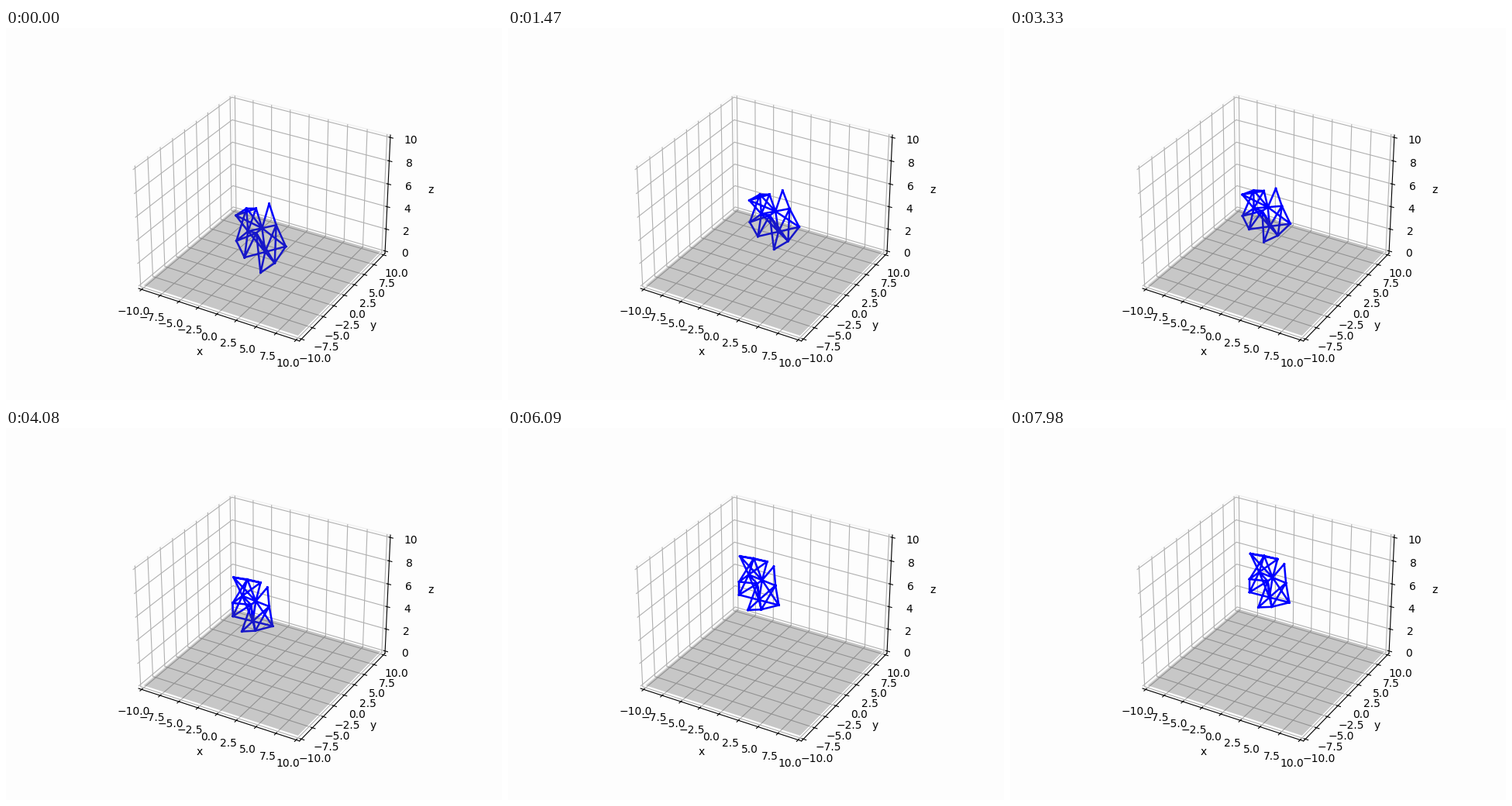
Write a matplotlib script that moves like this. It is 640 by 480 pixels and loops after 8 s.

```python
from itertools import combinations

import numpy as np
import matplotlib.pyplot as plt
from matplotlib.animation import FuncAnimation
from matplotlib.lines import Line2D
from matplotlib.transforms import IdentityTransform

W, H = 640, 480
FRAMES, STEP = 200, 40
PAPER = "#fdfdfd"
HOP, PERIOD, FIRST_HOP = 12, 820, 483

# Outer joints in a unit box, before and after the body turns
JOINTS = "abcdefghikn"
BEFORE = np.array([
    (.5, .12), (.17, -.5), (.31, -.19), (-.49, -.33), (-.09, -.43),
    (-.48, .04), (-.32, .28), (0, .5), (.28, .36), (-.25, -.1), (-.28, -.43)])
AFTER = np.array([
    (.5, .4), (.38, -.31), (.42, .04), (-.43, -.5), (.22, -.4),
    (-.45, -.03), (-.45, .21), (-.24, .49), (.08, .48), (-.22, -.16),
    (-.1, -.46)])

# Every two joints of a cell are tied by a spring
CELLS = "dnekj", "bcj", "acjl", "fgkm", "fkn", "jklm", "hilm", "ci", "gl", "ai"
SPRINGS = sorted({tuple(sorted(pair))
                  for cell in CELLS for pair in combinations(cell, 2)})


def ease(t, start, end):
    u = np.clip((t - start) / (end - start), 0, 1)
    return (1 - np.cos(np.pi * u)) / 2


def center(t):
    x = np.interp(t, [0, 1470, 3330, 4080, 5250, 6090, 7980],
                  [328.5, 343.5, 330, 317, 318, 322.5, 333.5])
    y = 261 - 55 * ease(t, 0, 6000)
    return x, y - HOP * np.cos(2 * np.pi * (t - FIRST_HOP) / PERIOD)


def joints(t):
    turn = ease(t, 3000, 4200)
    size = 65 - 11 * turn, 70 + 19 * np.exp(-t / 1300)
    shape = BEFORE + (AFTER - BEFORE) * turn
    pts = dict(zip(JOINTS, shape * size + center(t)))
    for inner, s, e in ("jkc", "lga", "mfc"):
        pts[inner] = (pts[s] + pts[e]) / 2
    return pts


fig = plt.figure(figsize=(W / 100, H / 100), dpi=100, facecolor=PAPER)
ax = fig.add_subplot(projection="3d", facecolor=PAPER)

gx, gy = np.meshgrid([-10, 10], [-10, 10])
ax.plot_surface(gx, gy, np.zeros((2, 2)), color="0.3", alpha=0.3,
                shade=False, linewidth=0)

for axis in (ax.xaxis, ax.yaxis, ax.zaxis):
    axis.pane.set_fill(False)
pad = 20 / 48
ax.set_xlim(-10 - pad, 10 + pad)
ax.set_ylim(-10 - pad, 10 + pad)
ax.set_zlim(-pad / 2, 10 + pad / 2)
ax.set_xlabel("x")
ax.set_ylabel("y")
ax.set_zlabel("z")

# Below the floor in drawing order, so the floor tints it
body = Line2D([], [], color="blue", lw=1.8, zorder=2,
              transform=IdentityTransform())
ax.add_artist(body)


def update(i):
    pts = joints(i * STEP)
    gap = (np.nan, np.nan)
    path = np.array([p for s, e in SPRINGS for p in (pts[s], pts[e], gap)])
    body.set_data(path[:, 0], H - path[:, 1])
    return (body,)


anim = FuncAnimation(fig, update, frames=FRAMES, interval=STEP, repeat=True)
plt.show()
```
